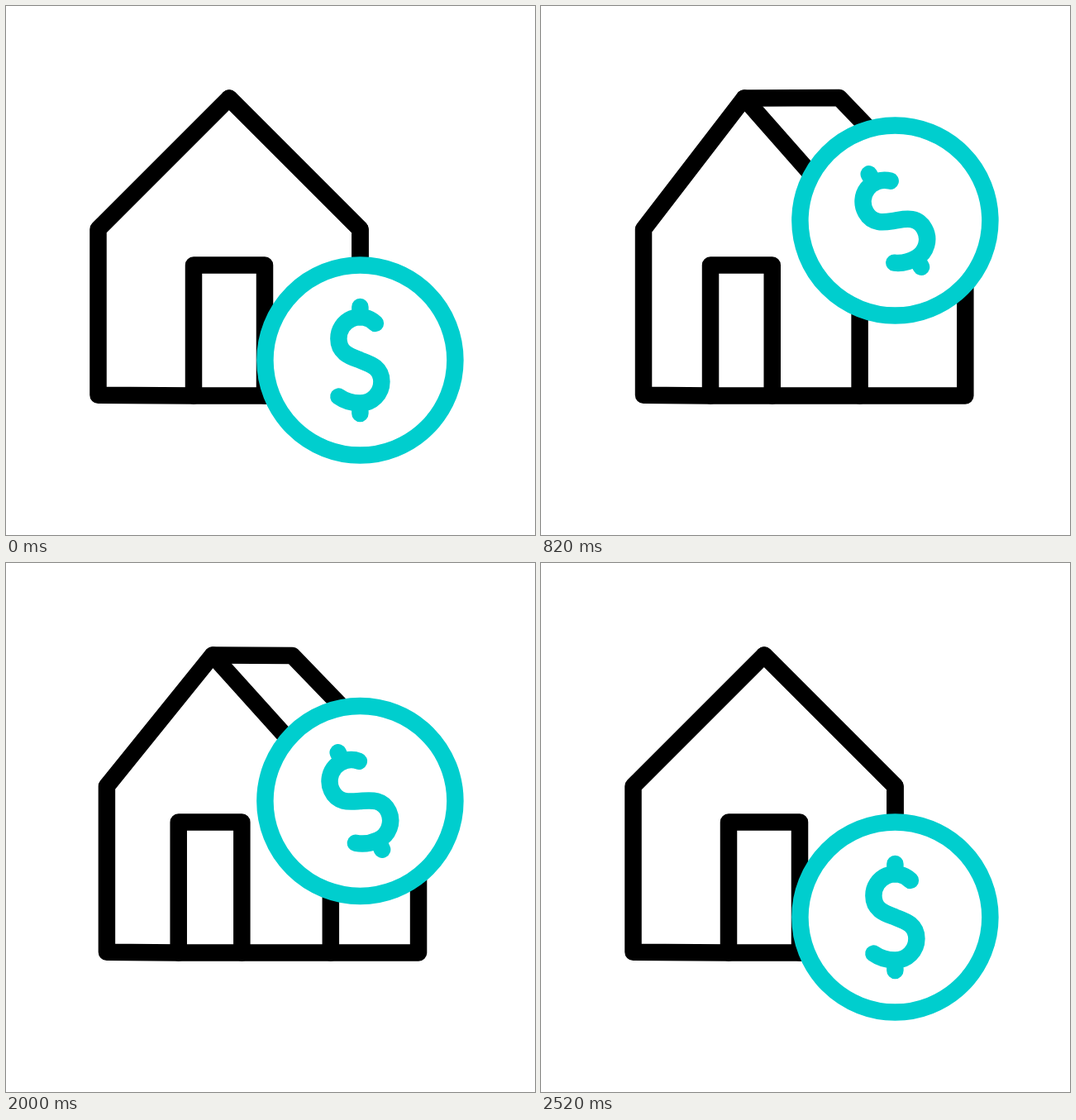
Animation, 640 px wide and 640 px high, one loop 2720 ms. Source, as an HTML page:

```html
<!DOCTYPE html>
<html lang="en">
<head>
<meta charset="utf-8">
<title>House and coin</title>
<style>
  html, body { margin: 0; width: 100%; height: 100%; overflow: hidden; background: #fff; }
  svg { display: block; width: 100vw; height: 100vh; }
  path, circle { fill: none; stroke-width: 20.5; stroke-linecap: round; stroke-linejoin: round; }
  #house path { stroke: #000; }
  #coin * { stroke: #00cece; }
  #coin circle { fill: #fff; }
</style>
</head>
<body>
<svg viewBox="0 0 640 640">
  <g id="house">
    <path id="side"/>
    <path id="front"/>
    <path id="door"/>
  </g>
  <g id="coin">
    <circle r="115"/>
    <path id="dollar" d="M18.5-44.5A26 26 0 0 0-26-26C-26-8-10.5-4 0 0S26 8 26 26A26 26 0 0 1 0 52C-10.5 52-19 49-26 44M0-64.5V-52M0 52V64.5"/>
  </g>
</svg>
<script>
const LOOP = 2720, STEP = 20;
const $ = id => document.getElementById(id);

// [time, value] keys, eased in and out between neighbours
const turnKeys = [[200, 0], [900, 1], [1800, 1], [2500, 0]];
const tiltKeys = [[200, 0], [900, -30.5], [1450, 0], [1800, -30.5], [2500, 0]];

function valueAt(keys, t) {
  if (t <= keys[0][0]) return keys[0][1];
  for (let i = 1; i < keys.length; i++) {
    const [t0, a] = keys[i - 1], [t1, b] = keys[i];
    if (t <= t1) {
      const u = (t - t0) / (t1 - t0);
      return a + (b - a) * u * u * (3 - 2 * u);
    }
  }
  return keys[keys.length - 1][1];
}

const line = (...pts) => 'M' + pts.map(p => p.join(' ')).join('L');

function draw(t) {
  const p = valueAt(turnKeys, t);
  const mix = (a, b) => a + (b - a) * p;

  const eave = 270, floor = 471.5;
  const apex = [mix(270, 245), 111.5];
  const left = mix(111.5, 124.5);
  const right = mix(428.5, 384);
  const back = mix(428.5, 516.5);
  const ridge = [mix(275.5, 363.8), mix(117, 110.7)];
  const doorL = mix(227, 204.2), doorR = mix(313, 278.5);

  $('front').setAttribute('d', line(apex, [left, eave], [left, 470.7],
    [doorL, floor], [right, floor], [right, eave]) + 'Z');
  $('side').setAttribute('d', line(apex, ridge, [back, eave], [back, floor], [right, floor]));
  $('door').setAttribute('d', line([doorL, floor], [doorL, 313.4], [doorR, 313.4], [doorR, floor]));

  $('coin').setAttribute('transform', `translate(428.4 ${mix(428.5, 253.2)})`);
  $('dollar').setAttribute('transform', `rotate(${valueAt(tiltKeys, t)})`);
}

const start = performance.now();
function tick() {
  const t = (performance.now() - start) % LOOP;
  draw(Math.floor(t / STEP) * STEP);
  requestAnimationFrame(tick);
}
tick();
</script>
</body>
</html>
```
